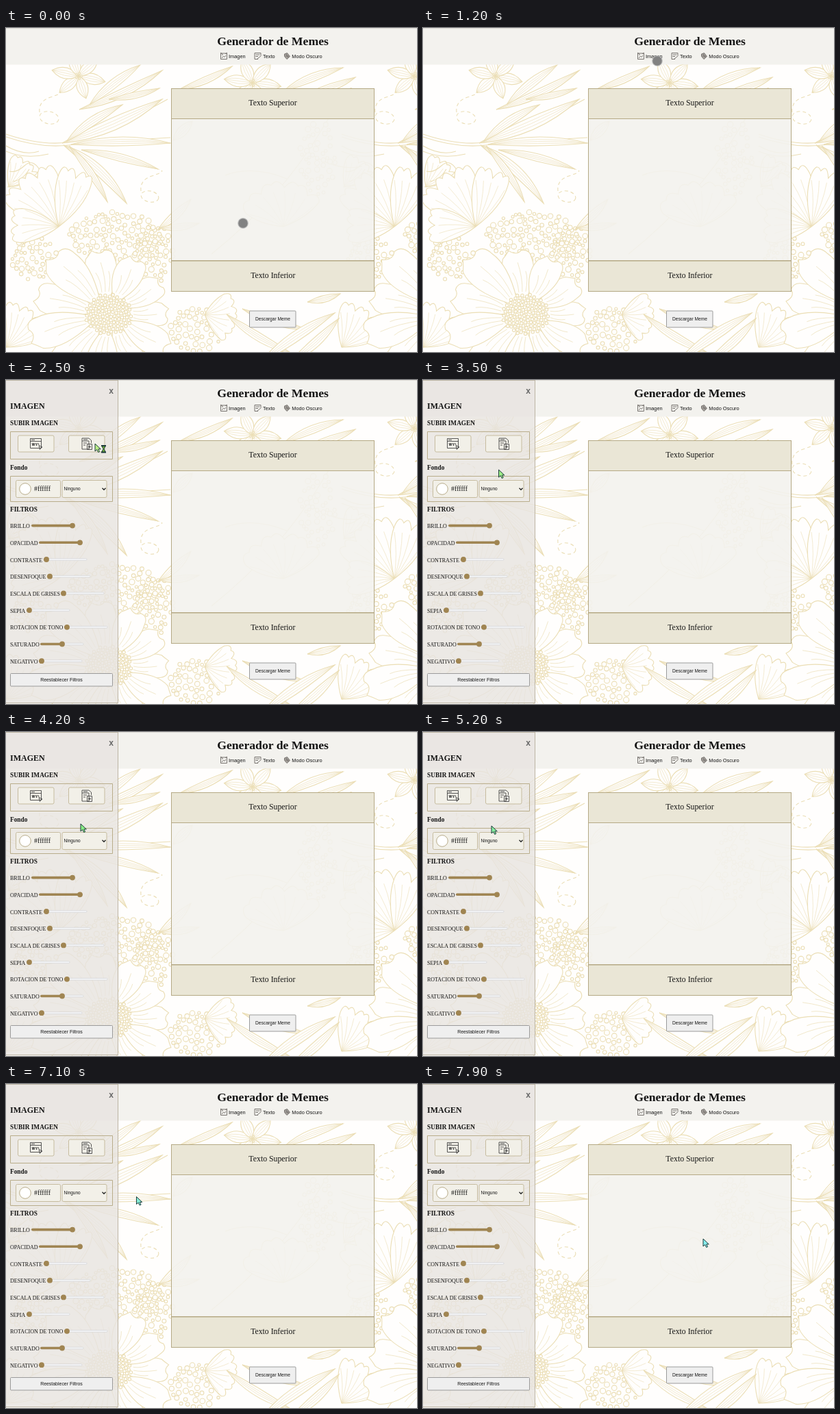
An HTML page with a canvas that plays this animation: 600x473 px, repeating every 8 s.

```html
<!DOCTYPE html>
<html lang="es">
<head>
<meta charset="utf-8">
<title>Generador de Memes</title>
<style>
  html, body { margin: 0; width: 600px; height: 473px; overflow: hidden; background: #fffefd; }
  canvas, svg { position: absolute; left: 0; top: 0; }
  text { font-family: "Liberation Serif", "Times New Roman", serif; fill: #151515; }
  .b { font-weight: bold; }
  .s { font-family: "Liberation Sans", Arial, sans-serif; }
  .m { text-anchor: middle; }
  .line { fill: none; stroke: #b9ad8b; }
  .band { fill: #eae6d6; stroke: #b5a985; }
  .field { fill: #f2f0e8; stroke: #c6bc9f; }
  .btn { fill: #efefef; stroke: #9b9b9b; }
  .icon { fill: none; stroke: #444; stroke-width: .9; }
  .nav { fill: none; stroke: #77736f; stroke-width: 1; }
</style>
</head>
<body>
<canvas id="bg" width="600" height="473"></canvas>
<svg width="600" height="473" viewBox="0 0 600 473">
  <rect width="600" height="53.5" fill="#f3f2ee"/>
  <path d="M0 .5H600" stroke="#dedcd6"/>
  <text class="b m" x="389.5" y="24.5" font-size="17.7">Generador de Memes</text>
  <g class="nav">
    <path d="M313.5 37H322.5V45.5H313.5ZM315 44L317.5 41L319 42.5L321 40M315 39H317M313 36L316 38M323 36L320 38"/>
    <path d="M363 36.5H372V40M363 36.5V45.5H368M364.5 39H370.5M364.5 41.5H368M367 45L372.5 40.5"/>
    <path d="M406.5 38L410.5 36.5L414.5 41.5L410 45.5L406.5 41.5ZM408 41H413M409 38L412 43" fill="#a5a19c"/>
  </g>
  <g class="s" font-size="7.4">
    <text class="s" x="325" y="43.8">Imagen</text>
    <text class="s" x="375" y="43.8">Texto</text>
    <text class="s" x="417.3" y="43.8">Modo Oscuro</text>
  </g>

  <rect x="241.5" y="132.5" width="296" height="207" fill="#f3f2eee8" stroke="#b5a985"/>
  <rect class="band" x="241.5" y="88.5" width="296" height="44"/>
  <rect class="band" x="241.5" y="340" width="296" height="44.5"/>
  <text class="m" x="389.5" y="113" font-size="11.8">Texto Superior</text>
  <text class="m" x="389.8" y="364.5" font-size="11.7">Texto Inferior</text>
  <rect class="btn" x="355.5" y="413" width="67.5" height="24" rx="1"/>
  <text class="s m" x="389.5" y="427.3" font-size="6.65">Descargar Meme</text>

  <g id="panel">
    <rect x="-1" y=".5" width="164.5" height="471" fill="#e8e5e1d0" stroke="#bdb5a4"/>
    <text class="s b" x="150.3" y="20" font-size="12" style="fill:#666">x</text>
    <text class="b" x="6" y="42" font-size="12">IMAGEN</text>
    <g font-size="9.3">
      <text class="b" x="6" y="66">SUBIR IMAGEN</text>
      <text class="b" x="6" y="131.3">Fondo</text>
      <text class="b" x="6" y="192.3">FILTROS</text>
    </g>
    <path class="line" d="M6.5 75.5H155.5V115.5H6.5ZM6.5 140.5H155.5V177.5H6.5Z"/>
    <rect class="field" x="17.5" y="81" width="52.5" height="24" rx="2"/>
    <rect class="field" x="91.5" y="81" width="52.5" height="24" rx="2"/>
    <path class="icon" d="M35.500 85.500H51.500V99.500H35.500ZM35.500 89.500H51.500M37 87.500H42M38 92L39 96L40 92L41 96L42 92M43.500 92L44.500 96L45.500 92M47 92L48 95M48 95.500L53 98L50.500 99L49.500 101.500Z"/>
    <path class="icon" d="M111 89V85H121L124.500 88V92M111 89H121V101H111ZM113 87H119M113 92H118M113 95H116M118.500 93.500H125.500V101.500H118.500ZM122 95.500V99.500M120 97.500H124"/>
    <rect class="field" x="14.500" y="146.500" width="65" height="25" rx="2"/>
    <rect class="field" x="82" y="146.500" width="65" height="25" rx="2"/>
    <circle cx="28" cy="159" r="8.300" fill="#fff" stroke="#b9ad8b"/>
    <text x="41" y="162.300" font-size="10">#ffffff</text>
    <text class="s" x="84.500" y="161.300" font-size="6.500">Ninguno</text>
    <path d="M140.500 157.800L143 160.300L145.500 157.800" fill="none" stroke="#222" stroke-width="1.300"/>
    <g id="filters" font-size="8"></g>
    <rect class="btn" x="6.500" y="428.500" width="149" height="18.500" rx="1"/>
    <text class="s m" x="81" y="440" font-size="6.950">Reestablecer Filtros</text>
  </g>

  <g id="cursor">
    <g id="disc"><circle r="7.800" fill="#bbb"/><circle r="6.700" fill="#828282"/></g>
    <g id="arrow" stroke="#1d3b3b" stroke-linejoin="round">
      <path d="M0 0V11L2.700 8.600L4.700 12.500L6.600 11.600L4.800 7.900H8.300Z"/>
      <g id="wait">
        <path d="M9 3H16M9 12.500H16" stroke-width="1.800"/>
        <path d="M9.800 3.500H15.200L13 7.700L15.200 12H9.800L12 7.700Z" fill="#6fae3c"/>
      </g>
    </g>
  </g>
</svg>
<script>
const $ = id => document.getElementById(id);
const TAU = Math.PI * 2;

// Sliders: label, left end, knob position
const filters = [
  ["BRILLO", 37, 97], ["OPACIDAD", 48, 108], ["CONTRASTE", 55, 59],
  ["DESENFOQUE", 60, 64], ["ESCALA DE GRISES", 80, 84], ["SEPIA", 30, 34],
  ["ROTACION DE TONO", 85, 89], ["SATURADO", 50, 82], ["NEGATIVO", 48, 52],
];
$("filters").innerHTML = filters.map(([label, x, knob], i) => {
  const y = 212.6 + i * 24.7;
  return `<text x="6" y="${y + 3.6}">${label}</text>
    <rect x="${x}" y="${y - 1.3}" width="63" height="2.600" rx="1.300" fill="#f5f6f8" stroke="#cdced2" stroke-width=".6"/>
    <rect x="${x}" y="${y - 1.8}" width="${knob - x}" height="3.600" rx="1.800" fill="#a08552"/>
    <circle cx="${knob}" cy="${y}" r="3.900" fill="#a08552"/>`;
}).join("");

// Floral line pattern
const g = $("bg").getContext("2d");
const PAPER = "#fffefd";
let seed = 7;
const rnd = () => (seed = seed * 16807 % 2147483647) / 2147483647;

function shape(d, fill) {
  const p = new Path2D(d);
  if (fill) g.fill(p);
  g.stroke(p);
}

function dot(x, y, r) {
  g.beginPath();
  g.arc(x, y, r, 0, TAU);
  g.fill();
  g.stroke();
}

function leaf(x, y, x2, y2, w, bend = 0) {
  const len = Math.hypot(x2 - x, y2 - y);
  const nx = (y - y2) / len, ny = (x2 - x) / len;
  const ctrl = k => `${(x + x2) / 2 + nx * (bend + k * w)} ${(y + y2) / 2 + ny * (bend + k * w)}`;
  shape(`M${x} ${y}Q${ctrl(1)} ${x2} ${y2}Q${ctrl(-1)} ${x} ${y}`, true);
  g.lineWidth = .6;
  for (const k of [-.45, 0, .45]) shape(`M${x} ${y}Q${ctrl(k)} ${x2} ${y2}`);
  g.lineWidth = 1.1;
}

function star(x, y, r, turn) {
  for (let i = 0; i < 6; i++) {
    const a = turn + i * TAU / 6;
    leaf(x, y, x + r * Math.cos(a), y + r * Math.sin(a) * .85, r * .4);
  }
  for (let i = 0; i < 5; i++) dot(x + 4 * Math.cos(i * 1.26), y + 4 * Math.sin(i * 1.26), 1.3);
}

// Scalloped leaf whose veins spread from one point
function fan(x, y, r, a, b, n) {
  const at = (q, k) => `${x + r * k * Math.cos(q)} ${y + r * k * Math.sin(q)}`;
  const step = (b - a) / n;
  let d = `M${x} ${y}Q${at(a - .25, .55)} ${at(a, .9)}`;
  for (let i = 0; i < n; i++)
    d += `Q${at(a + step * (i + .5), 1.12)} ${at(a + step * (i + 1), i % 2 ? .88 : .97)}`;
  shape(d + `Q${at(b + .25, .55)} ${x} ${y}`, true);
  g.lineWidth = .6;
  for (let i = 0; i <= n; i++) {
    const q = a + step * i;
    shape(`M${x} ${y}Q${at(q + .12, .45)} ${at(q, .8)}`);
  }
  g.lineWidth = 1.1;
}

function berries(x, y, rx, ry, tries) {
  const placed = [];
  for (let i = 0; i < tries; i++) {
    const a = rnd() * TAU, k = Math.sqrt(rnd()), r = 2 + rnd() * 2.2;
    const p = { x: x + rx * k * Math.cos(a), y: y + ry * k * Math.sin(a), r };
    if (placed.every(q => Math.hypot(q.x - p.x, q.y - p.y) > q.r + r + .7)) {
      placed.push(p);
      dot(p.x, p.y, r);
    }
  }
}

function ring(x, y, rx, ry) {
  g.setLineDash([5, 4]);
  g.beginPath();
  g.ellipse(x, y, rx, ry, .2, 0, TAU);
  g.stroke();
  shape(`M${x - rx} ${y - 8}q-2 -16 16 -22t14 -8`);
  g.setLineDash([]);
}

function bloom(x, y) {
  const sizes = [88, 102, 92, 108, 116, 122, 112, 126, 104, 98, 92];
  for (const layer of [0, 1]) sizes.forEach((size, i) => {
    if (i % 2 !== layer) return;
    const a = i * TAU / sizes.length, w = .3;
    const at = (q, r) => `${x + r * Math.cos(a + q)} ${y + r * .92 * Math.sin(a + q)}`;
    shape(`M${at(-.24, 30)}Q${at(-w - .12, size * .7)} ${at(-w * .75, size * .9)}
      Q${at(-.16, size * .94)} ${at(-.1, size)}Q${at(0, size * .9)} ${at(.08, size * .98)}
      Q${at(.2, size)} ${at(w * .8, size * .86)}Q${at(w + .1, size * .65)} ${at(.24, 30)}`, true);
    g.lineWidth = .7;
    for (const q of [-.14, 0, .14])
      shape(`M${at(q, 36)}Q${at(q + .07, size * .55)} ${at(q, size * (.8 - Math.abs(q)))}`);
    g.lineWidth = 1.1;
  });
  for (let i = 0; i < 120; i++) {
    const r = Math.sqrt(i / 120) * 34, a = i * 2.39996;
    dot(x + r * Math.cos(a), y + r * .88 * Math.sin(a), 2.2);
  }
}

function tile() {
  seed = 7;
  // upper sprays
  leaf(107, 119, 228, 62, 12, 10);
  leaf(122, 112, 196, 54, 13, -5);
  leaf(150, 104, 224, 88, 9, 5);
  star(106, 70, 40, .25);
  star(360, 80, 42, .15);
  leaf(252, 90, 330, 56, 10, 6);
  leaf(405, 92, 492, 58, 12, -6);
  leaf(440, 95, 510, 72, 10, 5);
  ring(63, 131, 14, 9);
  // left branch
  shape("M0 155Q50 172 90 167T236 104M0 159Q50 176 92 171T240 160");
  leaf(82, 168, 228, 104, 18, 9);
  leaf(88, 166, 170, 112, 13, -8);
  leaf(95, 170, 240, 168, 13, -7);
  leaf(84, 171, 176, 256, 14, -16);
  leaf(92, 172, 148, 254, 10, -8);
  leaf(110, 178, 222, 206, 11, -6);
  shape("M0 172Q26 187 48 180M0 180Q28 192 62 184");
  // curled bud and fan leaves
  fan(4, 232, 46, -1.5, -.35, 5);
  shape("M2 232Q32 231 49 207Q39 190 27 201T5 209M10 224Q25 222 34 206");
  ring(210, 246, 13, 8);
  berries(160, 304, 68, 36, 700);
  berries(42, 336, 34, 32, 260);
  berries(218, 330, 30, 42, 260);
  fan(77, 290, 88, -2.75, -1.6, 6);
  fan(77, 290, 85, -1.57, -.9, 4);
  fan(77, 290, 68, 2.75, 3.6, 4);
  leaf(222, 294, 270, 250, 12, 4);
  leaf(224, 292, 282, 285, 10, 4);
  leaf(244, 164, 272, 136, 14);
  // behind the card
  shape("M300 330Q400 250 460 150T500 110M410 220Q360 200 320 215M440 180Q480 210 520 202");
  berries(455, 190, 26, 55, 160);
  fan(405, 290, 65, -2.8, -.6, 7);
  // lower edge
  fan(0, 466, 64, -1.6, -.25, 7);
  berries(278, 440, 38, 34, 420);
  fan(290, 418, 46, -.8, 1, 7);
  leaf(322, 418, 418, 476, 12, 8);
  leaf(345, 410, 440, 440, 10, 7);
  leaf(370, 490, 480, 416, 15, -7);
  leaf(412, 490, 486, 424, 13, 7);
  leaf(440, 400, 488, 388, 10, 3);
  bloom(150, 418);
}

g.fillStyle = PAPER;
g.fillRect(0, 0, 600, 473);
g.strokeStyle = "#ebdeb5";
g.lineWidth = 1.1;
for (const shift of [490, 0]) {
  g.save();
  g.translate(shift, 0);
  tile();
  g.restore();
}

// Pointer path: time, x, y
const path = [
  [0, 346, 285], [150, 346, 285], [850, 342, 48], [1400, 342, 48],
  [1950, 42, 94], [2450, 130, 93], [3000, 130, 93], [3600, 109, 134],
  [4200, 109, 134], [4500, 100, 137], [5500, 100, 137], [6000, 96, 138],
  [6700, 96, 138], [7800, 409, 226], [8000, 409, 226],
];

function pointer(t) {
  const i = path.findIndex(k => k[0] > t);
  const [t0, x0, y0] = path[i - 1], [t1, x1, y1] = path[i];
  const u = (t - t0) / (t1 - t0), e = u * u * (3 - 2 * u);
  return [x0 + (x1 - x0) * e, y0 + (y1 - y0) * e];
}

const show = (id, on) => $(id).style.display = on ? "" : "none";

function draw(now) {
  const t = now % 8000;
  show("panel", t >= 1300);
  show("disc", t < 2400);
  show("arrow", t >= 2400);
  show("wait", t < 3000);
  $("cursor").setAttribute("transform", `translate(${pointer(t)})`);
  $("arrow").setAttribute("fill", `hsl(${90 + Math.max(0, t - 2500) / 60} 75% 73%)`);
  requestAnimationFrame(draw);
}
draw(performance.now());
</script>
</body>
</html>
```
